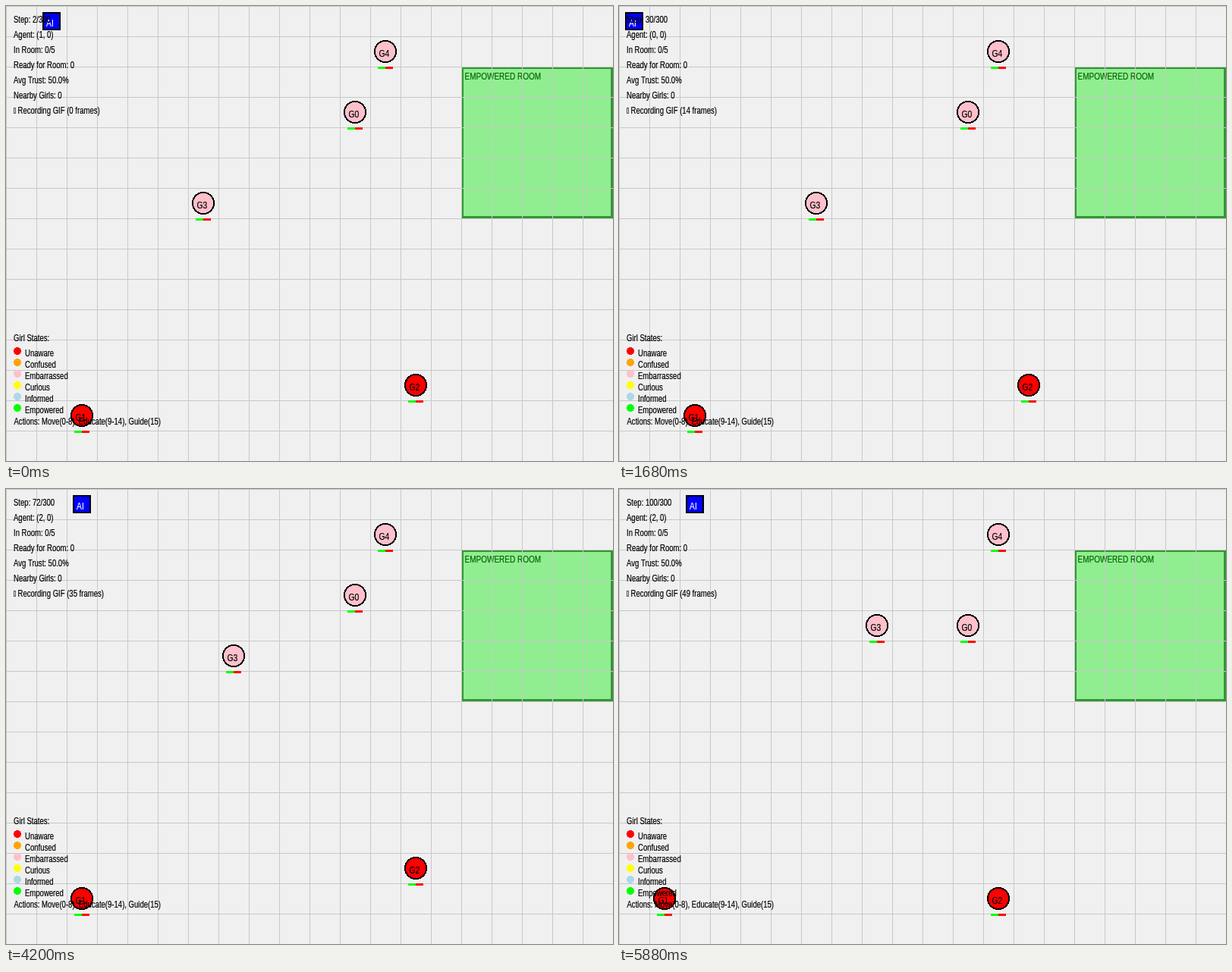
Recreate the animation shown at these times as an HTML page with a canvas. Size 800 by 600 pixels, loop 6000 ms.

```html
<!DOCTYPE html>
<html lang="en">
<head>
<meta charset="utf-8">
<title>Grid world</title>
<style>
  html, body { margin: 0; width: 100%; height: 100%; overflow: hidden; background: #f0f0f0; }
  canvas { display: block; }
</style>
</head>
<body>
<canvas id="stage" width="800" height="600"></canvas>
<script>
const ctx = document.getElementById('stage').getContext('2d');
const CELL = 40, TICK = 120, TICKS = 50;
const CONDENSE = 0.795;

const COLORS = {
  Unaware: '#ff0000',
  Confused: '#ffa500',
  Embarrassed: '#ffc0cb',
  Curious: '#ffff00',
  Informed: '#add8e6',
  Empowered: '#00ff00'
};

// Turning points of the walk; cells between them are interpolated
const walk = [
  { at: 0, x: 1, y: 0 },
  { at: 5, x: 3, y: 0 },
  { at: 8, x: 0, y: 0 },
  { at: 10, x: 2, y: 0 },
  { at: 14, x: 0, y: 0 },
  { at: 22, x: 1, y: 3 },
  { at: 29, x: 4, y: 3 },
  { at: 34, x: 2, y: 0 },
  { at: 40, x: 0, y: 2 },
  { at: 44, x: 0, y: 0 },
  { at: 49, x: 2, y: 0 }
];

// A girl takes one step (dx, dy) at each tick in `steps`
const girls = [
  { state: 'Embarrassed', x: 11, y: 3, dx: 0, dy: 1, steps: [45] },
  { state: 'Unaware', x: 2, y: 13, dx: -1, dy: 0, steps: [46] },
  { state: 'Unaware', x: 13, y: 12, dx: -1, dy: 1, steps: [42] },
  { state: 'Embarrassed', x: 6, y: 6, dx: 1, dy: -1, steps: [33, 37] },
  { state: 'Embarrassed', x: 12, y: 1, dx: 0, dy: 0, steps: [] }
];

const center = n => n * CELL + CELL / 2;

function agentCell(tick) {
  const i = Math.max(1, walk.findIndex(p => p.at >= tick));
  const a = walk[i - 1], b = walk[i];
  const f = (tick - a.at) / (b.at - a.at);
  return [Math.round(a.x + (b.x - a.x) * f), Math.round(a.y + (b.y - a.y) * f)];
}

function rect(color, x, y, w, h) {
  ctx.fillStyle = color;
  ctx.fillRect(x, y, w, h);
}

// Hard-edged circle, one row of pixels at a time
function disc(color, x, y, r) {
  for (let row = -r; row < r; row++) {
    const half = Math.round(Math.sqrt(r * r - (row + 0.5) ** 2));
    rect(color, x - half, y + row, half * 2, 1);
  }
}

function text(str, x, y, color = '#000', size = 12) {
  ctx.save();
  ctx.translate(x, y);
  ctx.scale(CONDENSE, 1);
  ctx.font = `${size}px "Liberation Sans", Arial, sans-serif`;
  ctx.fillStyle = ctx.strokeStyle = color;
  ctx.lineWidth = 0.2;
  ctx.fillText(str, 0, 0);
  ctx.strokeText(str, 0, 0);
  ctx.restore();
}

function drawRoom() {
  rect('#329632', 600, 80, 200, 200);
  rect('#90ee90', 603, 83, 194, 194);
  text('EMPOWERED ROOM', 604.5, 97, '#006400', 12.6);
}

function drawGrid() {
  for (let x = 0; x < 800; x += CELL) rect('#c8c8c8', x, 0, 1, 600);
  for (let y = 0; y < 600; y += CELL) rect('#c8c8c8', 0, y, 800, 1);
}

function drawGirl(girl, id, tick) {
  const taken = girl.steps.filter(at => at <= tick).length;
  const x = center(girl.x + girl.dx * taken);
  const y = center(girl.y + girl.dy * taken);
  disc('#000', x, y, 15);
  disc(COLORS[girl.state], x, y, 13);
  text('G' + id, x - 8.5, y + 7, '#000', 13);
  rect('#ff0000', x - 10, y + 20, 20, 3);
  rect('#00ff00', x - 10, y + 20, 10, 3);
}

function drawAgent(col, row) {
  const x = center(col), y = center(row);
  rect('#000', x - 12, y - 12, 24, 24);
  rect('#0000ff', x - 10, y - 10, 20, 20);
  text('AI', x - 7, y + 7, '#fff', 13);
}

function drawPanel(tick, col, row) {
  [
    `Step: ${2 + tick * 2}/300`,
    `Agent: (${col}, ${row})`,
    'In Room: 0/5',
    'Ready for Room: 0',
    'Avg Trust: 50.0%',
    'Nearby Girls: 0'
  ].forEach((line, i) => text(line, 10, 22 + i * 20));

  ctx.lineWidth = 1;
  ctx.strokeStyle = '#555';
  ctx.strokeRect(10.5, 134.5, 2, 7);
  text(`Recording GIF (${tick} frames)`, 15.5, 142);

  text('Girl States:', 10, 442);
  Object.entries(COLORS).forEach(([name, color], i) => {
    disc(color, 15, 455 + i * 15, 5);
    text(name, 25, 462 + i * 15);
  });
  text('Actions: Move(0-8), Educate(9-14), Guide(15)', 10.5, 552);
}

function draw(tick) {
  const [col, row] = agentCell(tick);
  rect('#f0f0f0', 0, 0, 800, 600);
  drawRoom();
  drawGrid();
  girls.forEach((girl, id) => drawGirl(girl, id, tick));
  drawAgent(col, row);
  drawPanel(tick, col, row);
}

const start = performance.now();
function loop() {
  draw(Math.floor((performance.now() - start) / TICK) % TICKS);
  requestAnimationFrame(loop);
}
loop();
</script>
</body>
</html>
```
